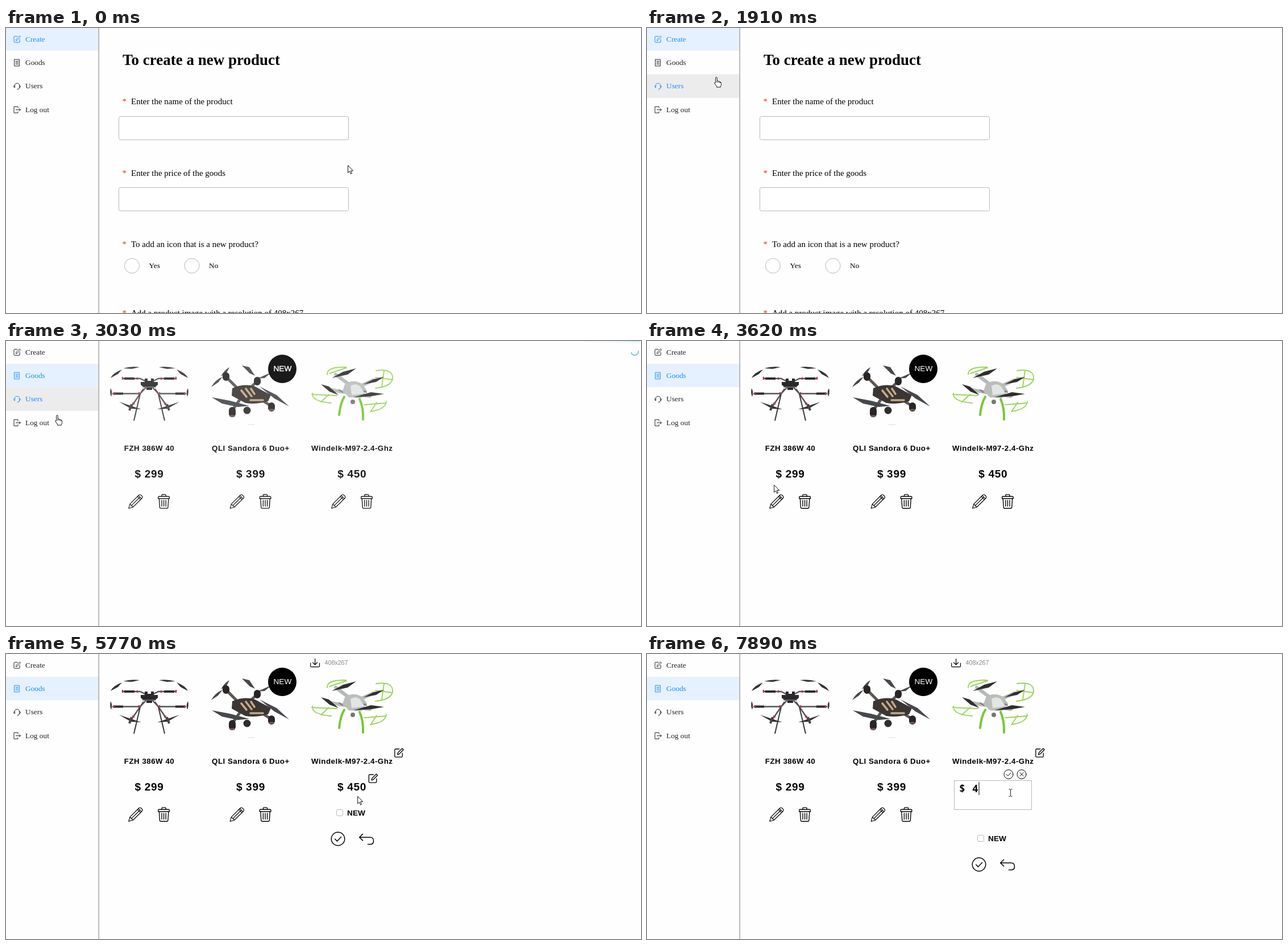
An HTML page that plays this animation: 1117 by 501 pixels, repeating every 8 s.

```html
<!DOCTYPE html>
<html lang="en">
<head>
<meta charset="utf-8">
<title>Shop admin</title>
<style>
  html, body { margin: 0; width: 100%; height: 100%; overflow: hidden; background: #fefefe; }
  body { position: relative; }
  svg { display: block; width: 1117px; height: 501px; }
  text { fill: currentColor; }
  .serif { font-family: "Liberation Serif", "Times New Roman", serif; }
  .sans { font-family: "Liberation Sans", Arial, sans-serif; }
  .bold { font-weight: 700; }
  .mid { text-anchor: middle; }
  .line { fill: none; stroke: currentColor; stroke-linecap: round; stroke-linejoin: round; }
  .box { fill: #fff; stroke: #b8b8b8; }
  #peg { position: absolute; top: -2px; left: 0; width: 100px; height: 2px;
    box-shadow: 0 0 10px #29d, 0 0 5px #29d; }
</style>
</head>
<body>
<svg viewBox="0 0 1117 501" id="stage">
  <defs>
    <g id="edit" class="line"><path d="M7 1.5H2.2Q1 1.5 1 2.7V11Q1 12.2 2.2 12.2H10Q11.2 12.2 11.2 11V7M4.6 9l.6-2.5L10.9.8l1.7 1.7-5.7 5.7z"/></g>
    <g id="doc" class="line"><path d="M2 .8h8.4v11.6H2zM4 4h4.4M4 6.5h4.4M4 9h4.4"/></g>
    <g id="headset" class="line"><path d="M2.4 9V5.5a4.1 4.1 0 0 1 8.2 0V9q0 3-3.6 3M2.4 5.6H1.6Q.6 5.6.6 7t1 1.6h.8M10.6 5.6h.8q1 0 1 1.4t-1 1.6h-.8"/></g>
    <g id="exit" class="line"><path d="M8 3V1H1v11h7v-2M4.5 6.5h7.8M10.2 4.4l2.1 2.1-2.1 2.1"/></g>
    <g id="pencil" class="line" stroke-width="1.15"><path d="M.8 25.2 3 17.6 18.6 2q2-2 4 0l1.5 1.5q2 2 0 4L8.4 23zM3 17.6 8.4 23M5.8 20.2 20 6M16.2 4.4l5.5 5.5M18 2.6l5.5 5.5"/></g>
    <g id="trash" class="line" stroke-width="1.35"><path d="M2 4.2h17q1.5 0 1.5 1.6V8H.8V5.8Q.8 4.2 2 4.2zM7 4V2.2Q7 .8 8.4.8h4.4q1.4 0 1.4 1.4V4M2.4 8l1 15.4q.1 1.8 1.8 1.8h10.9q1.7 0 1.8-1.8L18.9 8M7 11v10.5M10.6 11v10.5M14.2 11v10.5"/></g>
    <g id="tick" class="line"><circle r="8"/><path d="M-3.6.2-1 2.8 3.8-2.4"/></g>
    <g id="cross" class="line"><circle r="8"/><path d="M-3-3 3 3M3-3-3 3"/></g>
    <g id="arm1">
      <path d="M246 71 236 66H204M246 82 236 92.5H187M242 84 220 116" stroke="#565255" stroke-width="2.4"/>
      <path d="M208 66h18M190 92.5h16" stroke="#2e2c2e" stroke-width="4"/>
      <path d="M236 93 225 140" stroke="#3a383a" stroke-width="2"/>
      <path d="M184 65q4-9 20-15l-7 8zM206 48q14-4 29-2l-14 3zM199 107l18 6 21 7-18-1zM184 83q4 7 1 15-3-7-1-15z" fill="#333"/>
      <path d="M221 111l-4 11" stroke="#444" stroke-width="4"/>
      <path d="M205 63v5M190 90v5M231 64v4M222 109l4 2M234 90v5" stroke="#b33a44" stroke-width="2.5"/>
    </g>
    <g id="arrow"><path d="M.5.5v13l3-2.8 2 4.8 2-.9-2-4.6h4z" fill="#fff" stroke="#111"/></g>
    <g id="hand"><path d="M-1.3 1.6c0-1.6 2.6-1.6 2.6 0v5.2l2 .3.8.8 1.8.2.7.9q2 0 2 1.7v3q0 1.4-1.2 2.6V18h-6.8v-1.6l-3.6-4.7c-1-1.5.6-2.6 1.7-1.3zM1.3 7v3M4.1 8v2.4M6.6 9v2" fill="#fff" stroke="#111"/></g>
    <g id="beam"><path d="M-3-6.5q3 0 3 1.5 0-1.5 3-1.5M0-5V5M-3 6.5q3 0 3-1.5 0 1.5 3 1.5" fill="none" stroke="#222"/></g>
  </defs>

  <g id="menu" class="serif" font-size="13.33"></g>
  <path d="M163.2 0V501" stroke="#999" stroke-width="1.3"/>

  <g id="form" class="serif" font-size="15">
    <text class="bold" x="205" y="65" font-size="27">To create a new product</text>
    <rect class="box" x="198.5" y="155.5" width="404" height="41" rx="3"/>
    <rect class="box" x="198.5" y="280.5" width="404" height="41" rx="3"/>
    <circle class="box" cx="221.5" cy="418" r="13"/>
    <circle class="box" cx="327" cy="418" r="13"/>
    <text x="251.5" y="422" font-size="13.33">Yes</text>
    <text x="357" y="422" font-size="13.33">No</text>
  </g>

  <g id="shop" class="sans">
    <g id="hexa" fill="none">
      <use href="#arm1"/>
      <use href="#arm1" transform="matrix(-1 0 0 1 504 0)"/>
      <path d="M244 66h5v4h6v-4h5v6h7v5l-6 5h-4v4h-10v-4h-4l-6-5v-5h7z" fill="#2b292b"/>
      <path d="M240 81h24" stroke="#777" stroke-width="1.5"/>
    </g>
    <g id="dark" fill="none" stroke-linecap="round">
      <path d="M410 86 388 64M432 80l10-9M412 102l-14 20M450 104l16 10" stroke="#5d5753" stroke-width="5"/>
      <path d="M398 83q22-9 40-3l28 15-5 11q-22 6-40 3l-24-13z" fill="#3b3633"/>
      <path d="M414 87l9 11M422 84l10 13M431 84l6 9M430 104h22" stroke="#c5a985" stroke-width="3.6"/>
      <path d="M361 81q7-13 20-18l-8 10zM378 62q6-11 15-16l-5 10zM415 43l13 3 10 15-9-4zM442 66l25-11-12 10zM362 99l32 6 34 9-20 2-28-6zM446 80l30 15 22 20-26-14z" fill="#45484c"/>
      <path d="M387 61v3M442 69v3M398 122v6M467 114v4" stroke="#292526" stroke-width="12"/>
      <circle cx="424" cy="122" r="6.5" fill="#302d2d"/>
      <path d="M395 132h6M464 121h6" stroke="#795d50" stroke-width="3"/>
      <path d="M425 147h12" stroke="#ddd"/>
    </g>
    <g id="green" fill="none" stroke-linecap="round">
      <path d="M565 59q-1-14 33-13M569 57l30-10M539 92q-2 14 33 17M538 94l44 2M554 107l14-13M651 52q30-4 29 14-2 14-30 17M650 64l30 4M665 52l-4 28M669 106q-1 14-28 18M630 112l39-3M642 123l10-15" stroke="#9bd45a" stroke-width="1.9"/>
      <path d="M595 98q-7 12-9 32M622 102q7 16 6 36" stroke="#77c832" stroke-width="4"/>
      <path d="M603 76 580 59M602 91l-30-5M626 78l20-9M618 94l22 3" stroke="#b4bab6" stroke-width="6"/>
      <path d="M596 76q14-10 30-1l9 12-10 13-22-1-11-11z" fill="#b9bebb"/>
      <path d="M606 79q9-6 17 1l7 12-22 3z" fill="#e2e5e2"/>
      <path d="M573 65l20-11 23-6-15 11zM554 76l14 4 17 15-16-6zM611 99l31-9 23 3-22 4zM629 76l18-9 18-4-14 9z" fill="#2d302f"/>
      <circle cx="610" cy="107" r="4" fill="#777"/>
      <path d="M586 86l6 4M630 88l4 2" stroke="#777" stroke-width="2"/>
    </g>
    <circle cx="486" cy="49" r="25"/>
    <text id="badge" class="mid" x="486.4" y="53.3" font-size="13.6" style="fill:#fff;stroke:#fff">NEW</text>
  </g>

  <g id="editor" class="sans">
    <path class="line" d="M535.7 16v5.2q0 1.4 1.4 1.4h13q1.4 0 1.4-1.4V16M543.6 8.5v10.2M539.6 15l4 3.8 4-3.8" stroke-width="1.2"/>
    <text x="560.5" y="19" font-size="10.7" style="fill:#888">408x267</text>
    <use href="#edit" transform="translate(682.5 165) scale(1.32)"/>
    <g id="price">
      <text class="bold mid" x="608.6" y="240" font-size="19" letter-spacing=".7">$ 450</text>
      <use href="#edit" transform="translate(637 210) scale(1.32)"/>
    </g>
    <g id="area">
      <use href="#tick" x="636" y="211.5"/>
      <use href="#cross" x="659" y="211.5"/>
      <rect class="box" x="540.5" y="222.5" width="136" height="51"/>
      <text id="typed" class="bold" x="549" y="243" font-size="18" letter-spacing=".65" font-family="'Noto Sans Mono', 'DejaVu Sans Mono', monospace"></text>
      <path id="caret" d="M584 225v23" stroke="#000"/>
    </g>
    <g id="below">
      <rect class="box" x="581.5" y="318.5" width="11" height="11" rx="2"/>
      <text class="bold" x="600" y="328.5" font-size="13.7">NEW</text>
      <use href="#tick" transform="translate(584 370) scale(1.47)"/>
      <path class="line" d="M627.5 361.5l-5.8 5.7 5.8 5.7M622 367.2h18.5q6 0 6 6.2t-6 6.2h-4" stroke-width="1.5"/>
    </g>
  </g>

  <path id="spinner" d="M-4.6 4.6A6.5 6.5 0 0 1 4.6-4.6" fill="none" stroke="#29d" stroke-width="1.7"/>
  <use id="cursor"/>
</svg>
<div id="peg"></div>
<script>
const $ = id => document.getElementById(id);
const add = (id, html) => $(id).insertAdjacentHTML("beforeend", html);
const show = (id, on) => $(id).setAttribute("visibility", on ? "inherit" : "hidden");
const move = (id, x, y) => $(id).setAttribute("transform", `translate(${x} ${y})`);

const PITCH = 41.4;
[["Create", "edit"], ["Goods", "doc"], ["Users", "headset"], ["Log out", "exit"]].forEach(([label, icon], i) => {
  const y = i * PITCH;
  add("menu", `<g><rect y="${y - 1.5}" width="162.5" height="${PITCH}"/>
    <use href="#${icon}" x="13" y="${y + 13}"/><text x="34" y="${y + 23.5}">${label}</text></g>`);
});

[["Enter the name of the product", 134], ["Enter the price of the goods", 259.5],
 ["To add an icon that is a new product?", 384.5],
 ["Add a product image with a resolution of 408x267", 506]].forEach(([label, y]) =>
  add("form", `<text x="204.5" y="${y}" style="fill:#f22">*</text><text x="220" y="${y}">${label}</text>`));

[["FZH 386W 40", 299], ["QLI Sandora 6 Duo+", 399], ["Windelk-M97-2.4-Ghz", 450]].forEach(([name, price], i) => {
  const x = 252 + i * 178.4;
  add("shop", `<text class="bold mid" x="${x}" y="193.2" font-size="13.33" letter-spacing=".5">${name}</text>
    <g id="card${i}"><text class="bold mid" x="${x}" y="240" font-size="19" letter-spacing=".7">$ ${price}</text>
    <use href="#pencil" x="${x - 37}" y="269"/><use href="#trash" x="${x + 15}" y="269"/></g>`);
});

// Moments at which the screen refreshes: [first, last, count]
const ticks = [0];
for (const [a, b, n] of [[130, 960, 6], [1380, 2320, 8], [2470, 3490, 8], [3620, 3740, 2], [4050, 5070, 8],
  [5210, 6200, 8], [6350, 7310, 8], [7460, 7460, 1], [7740, 7890, 2]])
  for (let i = 0; i < n; i++) ticks.push(a + (b - a) * i / (n - 1 || 1));

// Linear interpolation through [time, value, ...] keys
function at(keys, t, col = 1) {
  const j = keys.findIndex(k => k[0] > t);
  if (j < 0) return keys[keys.length - 1][col];
  if (j === 0) return keys[0][col];
  const a = keys[j - 1], b = keys[j];
  return a[col] + (b[col] - a[col]) * (t - a[0]) / (b[0] - a[0]);
}

const pointer = [
  [0, 601, 241], [130, 606, 240], [296, 617, 237], [960, 493, 190], [1250, 493, 190],
  [1649, 230, 122], [1783, 145, 100], [1917, 122, 86], [2320, 90, 66], [2616, 86, 68],
  [2907, 88, 105], [3053, 90, 130], [3199, 130, 165], [3490, 219, 239], [3740, 227, 265],
  [3920, 227, 265], [4342, 430, 308], [4633, 573, 299], [5070, 586, 283], [5300, 588, 284],
  [6200, 645, 219], [6350, 645, 221], [6624, 643, 239], [7310, 639.5, 244]];
const shapes = [[0, "arrow"], [800, "beam"], [1380, "arrow"], [1700, "hand"], [3190, "arrow"],
  [4900, "hand"], [5400, "arrow"], [6050, "hand"], [6480, "beam"]];
const hovers = [[0, -1], [1700, 2], [2150, 1], [2900, 2], [3150, 3], [3300, -1]];
const texts = [[0, "$ 450"], [7460, "$ 45"], [7740, "$ 4"]];
const latest = (list, t) => list.filter(k => k[0] <= t).pop()[1];

function draw(time) {
  const t = ticks.filter(k => k <= time + 25).pop();
  const shop = t >= 2470, editing = t >= 5210, typing = t >= 6350;

  const hover = latest(hovers, t), chosen = shop ? 1 : 0;
  [...$("menu").children].forEach((row, i) => {
    const active = i === hover || i === chosen;
    row.style.color = active ? "#1890ff" : "#222";
    row.firstChild.setAttribute("fill", i === hover ? "#ececec" : i === chosen ? "#e6f1ff" : "none");
  });

  show("form", !shop);
  show("shop", shop);
  $("shop").style.opacity = at([[2415, 0], [3125, 1]], t);
  const heavy = t < 3200 || (t >= 5210 && t < 5700) || (t >= 6350 && t < 6900);
  $("badge").style.strokeWidth = heavy ? .4 : 0;

  show("card2", !editing);
  show("editor", editing);
  $("editor").style.opacity = at([[5120, 0], [5480, 1]], t);
  show("price", !typing);
  show("area", typing);
  move("area", at([[6350, 62], [6624, 25], [6900, 0]], t), 0);
  move("below", 0, at([[6350, -45], [6624, -25], [6900, 0]], t));
  $("typed").textContent = latest(texts, t);
  show("caret", t >= 7890);

  const busy = shop ? at([[2900, 1], [3053, .65], [3340, 0]], t) : 0;
  $("spinner").style.opacity = busy;
  $("spinner").setAttribute("transform", `translate(1106 18.5) rotate(${(t - 2616) * .9 + 180})`);
  $("peg").style.opacity = busy;
  $("peg").style.transform = `translateX(${at([[2616, -10], [2907, 1017]], t)}px) rotate(3deg) translateY(-4px)`;

  $("cursor").setAttribute("href", "#" + latest(shapes, t));
  move("cursor", at(pointer, t), at(pointer, t, 2));
}

const start = performance.now();
function loop() {
  draw((performance.now() - start) % 8000);
  requestAnimationFrame(loop);
}
loop();
</script>
</body>
</html>
```
